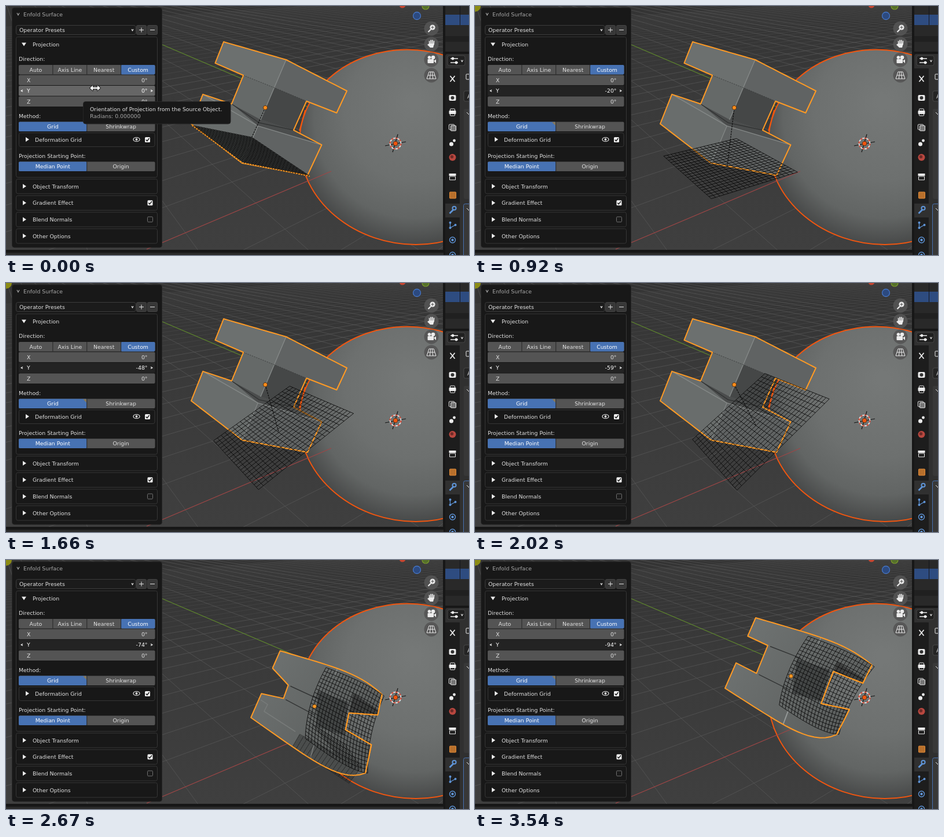
An HTML page with a canvas that plays this animation: 800 px wide and 431 px high, repeating every 3630 ms.

```html
<!DOCTYPE html>
<html lang="en">
<head>
<meta charset="utf-8">
<title>Projection direction</title>
<style>
html, body { margin: 0; width: 100%; height: 100%; overflow: hidden; background: #1b1b1b; }
canvas { display: block; width: 800px; height: 431px; }
</style>
</head>
<body>
<canvas id="stage" width="800" height="431"></canvas>
<script>
const ctx = document.getElementById('stage').getContext('2d');
const LOOP = 3630, FIRST = 246, STEP = 93.3;
// step number, angle in degrees
const ANGLES = [[0, 0], [8, 20], [16, 48], [20, 59], [24, 69], [31, 86], [36, 94]];
const BLUE = '#4772b3', GREY = '#545454', INK = '#e2e2e2', WHITE = '#ececec';
const ACTIVE = '#ff9a24', PICKED = '#f2560f', MESH = 'rgba(8,8,8,.9)';

// ---- helpers ----
const mix = (a, b, k) => Array.isArray(a) ? a.map((v, i) => mix(v, b[i], k)) : a + (b - a) * k;
const clamp = v => Math.max(0, Math.min(1, v));
const range = (n, f) => Array.from({ length: n + 1 }, (_, i) => f(i / n, i));
const bilinear = (q, u, v) => mix(mix(q[0], q[1], u), mix(q[3], q[2], u), v);

function path(pts, closed = true) {
  ctx.beginPath();
  pts.forEach(p => ctx.lineTo(...p));
  if (closed) ctx.closePath();
}
function fill(pts, color) { path(pts); ctx.fillStyle = color; ctx.fill(); }
function line(pts, color, width = 1, closed = false) {
  path(pts, closed);
  ctx.strokeStyle = color;
  ctx.lineWidth = width;
  ctx.stroke();
}
function dashed(pts, color, width, on, off) {
  ctx.setLineDash([on, off]);
  line(pts, color, width);
  ctx.setLineDash([]);
}
function rect(x, y, w, h, color) { ctx.fillStyle = color; ctx.fillRect(x, y, w, h); }
function paint(color, edge, width = 1) {
  if (color) { ctx.fillStyle = color; ctx.fill(); }
  if (edge) { ctx.strokeStyle = edge; ctx.lineWidth = width; ctx.stroke(); }
}
function dot(x, y, r, color, edge, width) {
  ctx.beginPath();
  ctx.arc(x, y, r, 0, 7);
  paint(color, edge, width);
}
function box(x0, y0, x1, y1, color, edge, r = 2) {
  ctx.beginPath();
  ctx.roundRect(x0, y0, x1 - x0, y1 - y0, r);
  paint(color, edge);
}
function chevron(x, y, dx, dy, color = INK) {
  line([[x - dx - dy, y - dy - dx], [x + dx, y + dy], [x - dx + dy, y - dy + dx]], color, 1.2);
}
function text(s, x, y, color = INK, align = 'left') {
  ctx.font = '9.35px "DejaVu Sans", sans-serif';
  ctx.textAlign = align;
  ctx.fillStyle = color;
  ctx.fillText(s, x, y + 3.5);
}
function lattice(at, n, color) {
  for (let i = 0; i <= n; i++) {
    line(range(12, s => at(s, i / n)), color, .95);
    line(range(12, s => at(i / n, s)), color, .95);
  }
}

// ---- viewport backdrop ----
const ORIGIN = [672, 239], VX = [1374, -60], VY = [-18, -60];

function ground(x, y) {
  const a = .085 * x, b = .075 * y;
  return ORIGIN.map((o, i) => (o + a * VX[i] + b * VY[i]) / (1 + a + b));
}
function backdrop() {
  const g = ctx.createLinearGradient(0, 0, 0, 422);
  g.addColorStop(0, '#343434');
  g.addColorStop(.4, '#3a3a3a');
  g.addColorStop(1, '#3f3f3f');
  rect(0, 0, 756, 422, g);
  for (let i = -9; i <= 34; i++) {
    if (!i) continue;
    const color = `rgba(98,98,98,${i > 10 ? .3 : .6})`;
    line([ground(1.5 - (1 + .075 * i) / .085, i), ground(60, i)], color, .9);
    line([ground(i, 1.5 - (1 + .085 * i) / .075), ground(i, 60)], color, .9);
  }
  line([[200, 37], ORIGIN], '#608a2c', 1.3);
  line([[243, 421], ORIGIN], '#a34646', 1.3);
}
function sphere() {
  ctx.save();
  ctx.transform(1, 0, .045, 1, 700.5, 244.3);
  ctx.beginPath();
  ctx.ellipse(0, 0, 193.5, 168.7, 0, 0, 7);
  ctx.restore();
  const g = ctx.createRadialGradient(705, 165, 10, 705, 205, 226);
  ['#757877', '#6d706f', '#626564', '#3e3f3f'].forEach((c, i) => g.addColorStop([0, .5, .75, 1][i], c));
  paint(g, PICKED, 2);
  line([[520, 304], [562, 286]], '#a04444', 1.1);
}
function cursor3d() {
  const [x, y] = [673, 238];
  line([[x - 18, y + 4], [x + 18, y - 3]], '#151515', 1.2);
  line([[x - 5, y + 15], [x + 4, y - 16]], '#151515', 1.2);
  dot(x, y, 9.5, null, '#f0f0f0', 1.7);
  ctx.setLineDash([3.7, 3.7]);
  dot(x, y, 9.5, null, '#e23c25', 1.7);
  ctx.setLineDash([]);
  dot(x, y, 3.8, PICKED, '#4a2512', .8);
}

// ---- H-shaped solid: x runs -1..1 along the legs, v runs 0..1 across them ----
function rim(at, left, right, top, low) {
  return [
    ...range(20, s => at(2 * s - 1, 0)),
    at(1, .26), at(right, top), at(right, low), at(1, .64),
    ...range(20, s => at(1 - 2 * s, 1)),
    at(-1, .64), at(left, low), at(left, top), at(-1, .26)
  ];
}

// left edge, ridge and right edge of the bent slab
const RIBS = [[[376, 62], [320, 204]], [[484, 93], [408, 272]], [[589, 147], [521, 293]]];
function slab(x, v) {
  const [l, m, r] = RIBS.map(([a, b]) => mix(a, b, v));
  return x < 0 ? mix(m, l, -x) : mix(m, r, x);
}

// flat grid swinging about a pivot; a and b run -1..1
function swing(deg) {
  const t = deg * Math.PI / 180, c = Math.cos(t), s = Math.sin(t);
  const down = [-50, 86], side = [55, 11], across = [47, 33], lift = clamp(1 - deg / 20);
  return (a, b) => [0, 1].map(i =>
    [464, 193][i] + [6, -29][i] * lift
    + c * down[i] + s * side[i]
    + a * (1 + .06 * b) * (c * side[i] - s * down[i])
    + b * (across[i] + a * s * [5, -8][i]));
}

function solid(a) {
  const face = (pts, color) => fill(pts.map(p => slab(...p)), color);
  const edge = (pts, color, w) => line(pts.map(p => slab(...p)), color, w);
  const n = .52, top = .27, low = .58, light = '#858988';
  const outline = rim(slab, -n, n, top, low);
  fill(outline, '#606363');
  face([[-1, 0], [0, 0], [0, top], [-n, top], [-1, .26]], '#6c706f');
  face([[-n, top], [0, top], [0, low], [-n, low]], '#656968');
  face([[0, top], [n, top], [n, low], [0, low]], '#454747');
  face([[-n, low], [0, low], [n, low], [1, .64], [0, .64]], '#4b4d4d');
  face([[-1, .64], [-n, low], [0, .64], [0, 1], [-1, 1]], '#696d6c');
  edge([[-n, low], [0, .61], [n, low]], '#2e3030', 1.2);
  edge([[0, 0], [0, low]], light, 1.4);
  edge([[-1, .64], [0, .64], [1, .64]], light, 1.4);
  edge([[0, .64], [0, 1]], light, 1.2);
  dashed([[-n, top], [0, top], [n, top]].map(p => slab(...p)), '#383a3a', .9, 2, 2);
  line([[517, 180], [507, 216]], PICKED, 1.8);
  line(outline, ACTIVE, 2, true);

  const at = swing(a);
  if (!a) fill([at(-1, -1), at(1, -1), at(1, 1), at(-1, 1)], 'rgba(14,14,14,.35)');
  lattice((u, v) => at(2 * u - 1, 2 * v - 1), 20, MESH);
  if (!a) dashed([at(-1, -1), at(-1, 1), at(1, 1)], ACTIVE, 1.6, 3, 1.5);
  dashed([[448, 176], a ? at(0, 0) : at(1, -1)], '#0c0c0c', 1.2, 3, 1.5);
  dot(448, 176, 3.6, '#ff8d1c', '#4a2b0c', .9);
}

// corners of the wrapped solid at 69 and 94 degrees
const WRAP = [
  [[471, 171], [641, 245], [620, 385], [421, 285]],
  [[485, 100], [686, 182], [625, 302], [432, 222]]
];
function wrapped(a) {
  const k = (a - 69) / 25, q = mix(...WRAP, k), pinch = clamp((80 - a) / 11);
  const at = (u, v, curl = 1) => {
    const [x, y] = bilinear(q, u, v);
    return [x, y + 67 * curl * (v - .35) * u * (1 - u ** 4)];
  };
  const net = (u, v) => {
    const [x, y] = at(.45 + .57 * u, v * (.88 + .12 * u), .5);
    return [x - 32 * v * (1 - v), y];
  };
  const spots = pts => pts.map(p => at(...p));
  const top = mix(.28, .46, pinch), low = mix(.64, .49, pinch);
  const outline = rim((x, v) => at((x + 1) / 2, v), -.64, .5, top, low);

  const g = ctx.createLinearGradient(450, 170, 640, 310);
  g.addColorStop(0, '#6d7170');
  g.addColorStop(1, '#5a5d5c');
  fill(outline, g);
  fill(spots([[.44, .3], [.72, .28], [.75, .62], [.5, .66]]), 'rgba(36,38,38,.5)');
  fill(spots([[.75, top], [1, .26], [1, .2], [.75, .17]]), 'rgba(35,36,36,.55)');
  [top, low].forEach(v => line(spots([[.2, v], [.47, v]]), '#333535', 1.5));
  line(spots([[.52, .82], [.52, 1]]), '#959998', 2);
  line(spots([[.56, 0], [.56, .11]]), '#8a8e8c', 1.5);

  if (pinch) {
    const hung = [[500, 296], [605, 350], [567, 400], [478, 334]];
    const rest = [net(0, 1), net(1, 1), net(1, 1), net(0, 1)];
    const tail = mix(rest, hung, pinch);
    ctx.globalAlpha = pinch;
    line([[440, 242], [452, 250], [446, 262], [500, 297]], '#858988', 1.5);
    range(8, s => line([net(.1 + .5 * s, .75), mix(tail[0], tail[1], .6 + .4 * s)], '#161616', 1.3));
    lattice((u, v) => bilinear(tail, u, v), 16, MESH);
    ctx.globalAlpha = 1;
  }
  line(outline, ACTIVE, 2, true);
  lattice(net, 20, MESH);
  line(outline.slice(20, 26), ACTIVE, 2);
  dot(...mix([530, 266], [546, 201], k), 3.4, ACTIVE, '#4a2b0c', .8);
}

// ---- viewport controls ----
function controls(started) {
  if (started) dot(0, 0, 10, '#8c8c14');
  dot(685, -2, 5.5, '#c8452f');
  dot(725, 0, 6, '#55702a', '#7c9a2c', 1.2);
  dot(710, 17, 6.5, '#2c4a80', '#4676c6', 1.3);
  range(3, (_, i) => dot(735, 39 + 27 * i, 12.5, 'rgba(84,84,84,.9)'));
  // zoom
  dot(737, 37, 4.6, WHITE);
  line([[734, 40.5], [729.5, 45]], WHITE, 2.2);
  line([[734.5, 37], [739.5, 37]], '#555', 1.1);
  line([[737, 34.5], [737, 39.5]], '#555', 1.1);
  // hand
  fill([[731, 65], [740, 65], [738, 72], [733, 72], [728, 67]], WHITE);
  range(3, (s, i) => line([[731.5 + 8 * s, 60.5 - 2 * Math.sin(3 * s)], [732 + i * 2.3, 67]], WHITE, 1.8));
  // camera
  dot(731.5, 89, 2.8, WHITE);
  dot(738, 89, 3.3, WHITE);
  box(728.5, 92, 739, 99, WHITE, null, 1);
  fill([[739, 95], [743, 92.5], [743, 99]], WHITE);
  // perspective grid
  range(3, s => line([[731 + 8 * s, 114], [727 + 16 * s, 126]], WHITE, 1));
  range(2, s => line([[731 - 4 * s, 114 + 12 * s], [739 + 4 * s, 114 + 12 * s]], WHITE, 1));
}

// ---- side editor ----
function sidebar() {
  rect(755, 0, 45, 431, '#171717');
  rect(0, 422, 800, 9, '#171717');
  rect(0, 427, 756, 4, '#2a2a2a');
  rect(759, 0, 41, 79, '#292929');
  rect(759, 15, 41, 18, '#2e4c80');
  rect(759, 52, 41, 10, '#202020');
  line([[784.5, 0], [784.5, 33]], '#15171c');
  box(759, 83, 806, 431, '#303030', null, 4);
  rect(759, 108, 25, 323, '#1d1d1d');
  rect(759, 342, 26, 24, '#303030');
  box(763, 86, 793, 103, '#202020', '#454545', 3);
  [91, 98].forEach((y, i) => {
    line([[768, y], [781, y]], WHITE, 1.5);
    dot(772 + 6 * i, y, 2.4, WHITE);
  });
  chevron(788, 95, 0, 1.6);

  const x = 771.5, sky = '#5f95d8';
  // tool
  line([[x - 4, 121], [x + 4, 131]], WHITE, 1.8);
  line([[x + 4, 121], [x - 4, 131]], WHITE, 1.8);
  // render, output, layers
  box(x - 6, 154, x + 6, 164, WHITE);
  dot(x, 159, 3, '#333');
  box(x - 6, 181, x + 6, 187, WHITE, null, 1);
  box(x - 4, 178, x + 4, 190, null, WHITE, 1);
  box(x - 6, 205, x + 3, 214, null, WHITE, 1);
  box(x - 3, 207, x + 6, 216, '#777', WHITE, 1);
  // scene, world, archive
  dot(x - 2, 239, 3.5, WHITE);
  dot(x + 3, 233, 2.4, WHITE);
  dot(x, 262, 6, '#b8473f');
  dot(x - 1, 261, 2.7, '#6e2b28');
  box(x - 6, 290, x + 6, 294, WHITE, null, 0);
  box(x - 5, 295, x + 5, 301, null, WHITE, 0);
  // object, modifiers, particles, physics
  box(x - 5, 322, x + 6, 333, '#b8702c', '#e08a38', 1);
  line([[x - 5, 359], [x + 2, 352]], sky, 2.8);
  dot(x + 3, 350, 3.1, null, sky, 2);
  const tri = [[x - 4, 375], [x - 4, 384], [x + 5, 379]];
  line(tri, sky, 1.3);
  tri.forEach(p => dot(...p, 2, sky));
  [405, 431].forEach(y => {
    dot(x, y, 5, null, sky, 1.4);
    dot(x, y, 2.2, sky);
  });
  box(795, 118, 806, 127, null, WHITE, 1);
  box(791, 147, 806, 165, '#242424', '#484848', 3);
  text('A', 797, 156);
  box(791, 178, 806, 334, '#383838', null, 3);
  box(790.5, 342.5, 806, 440, '#383838', BLUE, 3);
  [186, 352].forEach(y => line([[796, y - 2], [800, y + 2]], WHITE));
}

// ---- operator panel ----
const EDGE = '#363636';
function arrow(x, y, open) {
  fill(open ? [[x - 4, y - 2.5], [x + 4, y - 2.5], [x, y + 3.5]]
            : [[x - 2, y - 4], [x + 4, y], [x - 2, y + 4]], WHITE);
}
function check(x, y, on) {
  box(x - 4.5, y - 4.5, x + 4.5, y + 4.5, on ? '#f0f0f0' : '#1a1a1a', on ? null : '#707070', 1.5);
  if (on) line([[x - 2.6, y], [x - .7, y + 2.2], [x + 3, y - 2.6]], '#1a1a1a', 1.5);
}
function tabs(labels, picked, y) {
  const w = 235.5 / labels.length, h = 16.5;
  box(22, y, 257.5, y + h, GREY);
  labels.forEach((s, i) => {
    const x = 22 + i * w;
    if (i === picked) box(x, y, x + w, y + h, BLUE);
    if (i) line([[x, y], [x, y + h]], '#252525');
    text(s, x + w / 2, y + h / 2, i === picked ? '#fff' : INK, 'center');
  });
}
function panel(a, started) {
  box(10.5, 3, 269.5, 418, '#181818', '#262626', 4);
  chevron(21, 14, 0, 2, '#a5a5a5');
  text('Enfold Surface', 30, 14, '#a8a8a8');
  box(17.5, 33.5, 224, 49.5, '#1b1b1b', '#3c3c3c', 3);
  text('Operator Presets', 23, 41.5);
  chevron(218.5, 41.5, 0, 1.5);
  [234, 253].forEach((x, i) => {
    box(x - 8.5, 33.5, x + 8.5, 49.5, '#373737', '#454545');
    line([[x - 4, 41.5], [x + 4, 41.5]], INK);
    if (!i) line([[x, 37.5], [x, 45.5]], INK);
  });

  box(17.5, 53.5, 261.5, 296.5, '#181818', EDGE, 3);
  arrow(31, 66, true);
  text('Projection', 46, 66);
  text('Direction:', 22, 91.5);
  tabs(['Auto', 'Axis Line', 'Nearest', 'Custom'], 3, 102);
  ['X', 'Y', 'Z'].forEach((s, i) => {
    const y = 119.5 + i * 18.5, mid = y + 8.8, live = i === 1, ink = live ? '#fff' : INK;
    box(22, y, 257.5, y + 17.5, !live ? GREY : started ? '#232323' : '#666666');
    text(s, 36, mid, ink);
    text(live && started ? `-${Math.round(a)}°` : '0°', 244.5, mid, ink, 'right');
    if (live) {
      chevron(27.5, mid, -1.5, 0, ink);
      chevron(251.5, mid, 1.5, 0, ink);
    }
  });
  text('Method:', 22, 190);
  tabs(['Grid', 'Shrinkwrap'], 0, 200.5);
  if (started) fill([[133, 201], [139, 201], [139, 207]], '#85775a');
  box(22.5, 219.5, 257, 243.5, '#181818', EDGE, 3);
  arrow(36, 231, false);
  text('Deformation Grid', 50, 231.5);
  ctx.beginPath();
  ctx.ellipse(225.5, 231, 5.5, 3.5, 0, 0, 7);
  paint(null, WHITE, 1.2);
  dot(225.5, 231, 1.9, WHITE);
  check(244.5, 231.5, true);
  text('Projection Starting Point:', 22, 259);
  tabs(['Median Point', 'Origin'], 0, 269.5);

  [['Object Transform'], ['Gradient Effect', true], ['Blend Normals', false], ['Other Options']]
    .forEach(([s, on], i) => {
      const y = 312 + i * 28.7;
      box(17.5, y - 12.5, 261.5, y + 12.8, '#181818', EDGE, 3);
      arrow(31, y, false);
      text(s, 46, y);
      if (on !== undefined) check(249, y, on);
    });
}
function tooltip() {
  box(133.5, 165.5, 388, 204, '#181818', '#262626', 4);
  text('Orientation of Projection from the Source Object.', 145, 178);
  text('Radians: 0.000000', 145, 190, '#a6a6a6');
  const half = [[-9, 0], [-4, -4.5], [-4, -1.2], [4, -1.2], [4, -4.5]];
  const arrows = [...half, ...half.map(([x, y]) => [-x, -y])].map(([x, y]) => [154 + x, 142 + y]);
  line(arrows, '#222', 2, true);
  fill(arrows, '#fff');
}

// ---- playback ----
function angleAt(n) {
  const i = Math.max(1, ANGLES.findIndex(k => k[0] >= n));
  const [n0, a0] = ANGLES[i - 1], [n1, a1] = ANGLES[i];
  return mix(a0, a1, (n - n0) / (n1 - n0));
}
function draw(n) {
  const a = angleAt(n), started = n > 0;
  ctx.lineJoin = 'round';
  backdrop();
  sphere();
  if (a < 63) solid(a); else wrapped(a);
  cursor3d();
  controls(started);
  sidebar();
  panel(a, started);
  if (!started) tooltip();
}
let shown = -1;
const start = performance.now();
function tick() {
  const t = (performance.now() - start) % LOOP;
  const n = Math.max(0, Math.min(36, Math.floor((t - FIRST) / STEP) + 1));
  if (n !== shown) draw(shown = n);
  requestAnimationFrame(tick);
}
tick();
</script>
</body>
</html>
```
